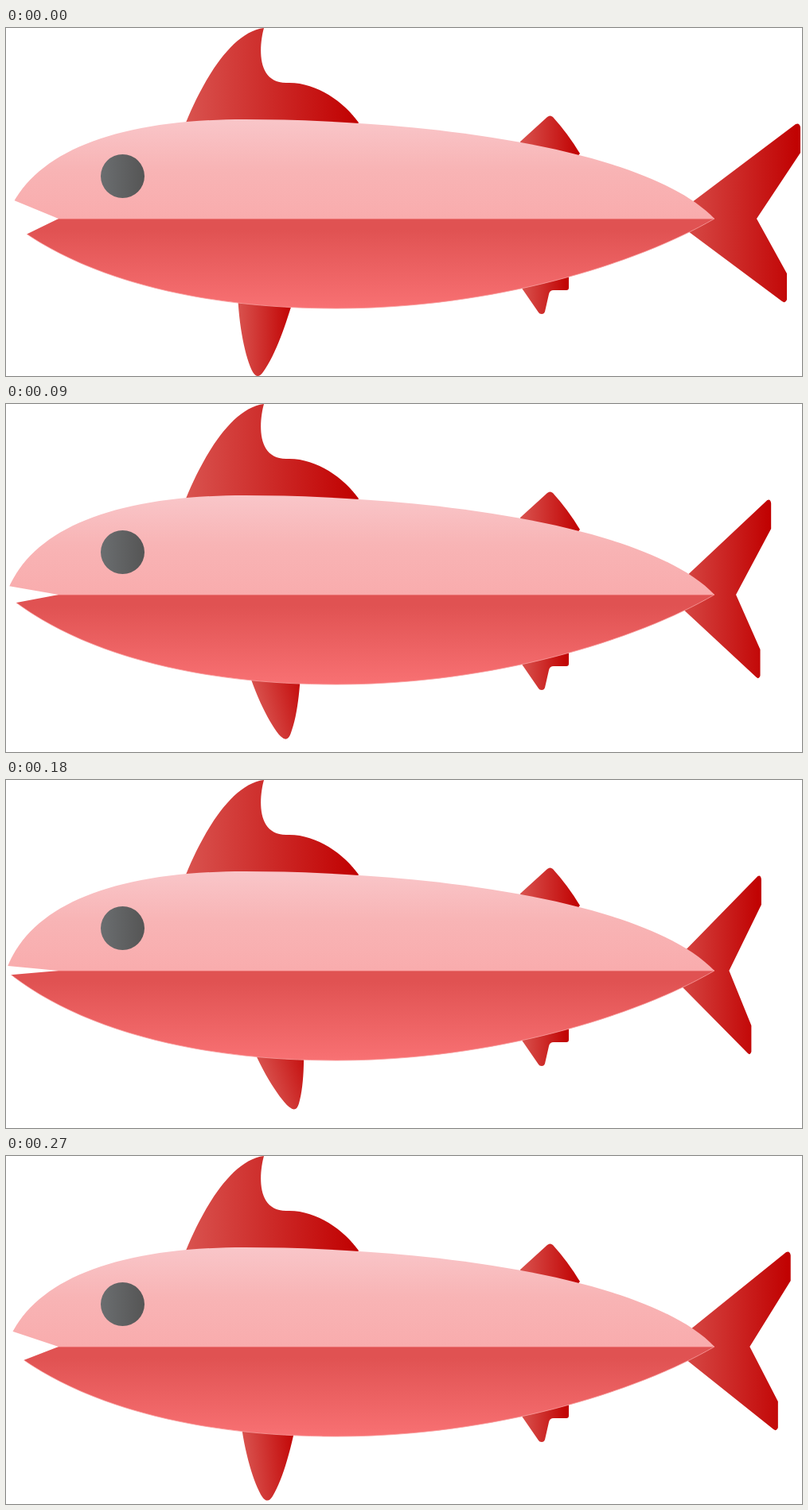
An HTML page that plays this animation: 1000 px wide and 438 px high, repeating every 0.3 s.

```html
<!DOCTYPE html>
<html lang="en">
<head>
<meta charset="utf-8">
<title>Swimming fish</title>
<style>
html, body { margin: 0; width: 100%; height: 100%; overflow: hidden; background: #fff; }
svg { display: block; width: 100%; height: 100%; }
</style>
</head>
<body>
<svg viewBox="0 0 1000 438">
  <defs>
    <linearGradient id="red">
      <stop stop-color="#d9534f"/><stop offset="1" stop-color="#c00000"/>
    </linearGradient>
    <linearGradient id="back" x2="0" y2="1">
      <stop stop-color="#f9c6c9"/><stop offset=".5" stop-color="#f8b4b5"/><stop offset="1" stop-color="#f9acad"/>
    </linearGradient>
    <linearGradient id="belly" x2="0" y2="1">
      <stop offset=".12" stop-color="#e05252"/><stop offset="1" stop-color="#f87173"/>
    </linearGradient>
    <linearGradient id="grey">
      <stop stop-color="#6b6e70"/><stop offset="1" stop-color="#555"/>
    </linearGradient>
  </defs>
  <g fill="url(#red)">
    <path d="M226 119C246 70 282 5 324 0C318 22 314 69 352 69C388 67 424 92 443 119L440 125H226Z"/>
    <path d="M646 143L680 112Q683.500 109 687 112Q706 133 721 158L715 165H650Z"/>
    <path d="M647 326L669 358Q670 360 673 360Q676 360 677 357L682 335Q683 330 688 330H704Q707 330 707 327V312L690 300H655Z"/>
    <path id="tail" d="M835 239.500L992 121Q997 119 998 125V157L943 240L981 309V342Q979 347 975 344Z"/>
    <path id="fin" d="M291 330C292 375 301 416 310 433Q316 443 323 433C339 411 352 372 362 338Z"/>
  </g>
  <path fill="url(#back)" d="M0 240C28 160 130 115 300 115C500 115 800 146 890 240Z"/>
  <path fill="url(#belly)" stroke="#f9a0a0" stroke-width=".8" d="M0 240C90 314 240 353 415 353C610 353 790 298 890 240Z"/>
  <circle cx="146.500" cy="186.500" r="27.500" fill="url(#grey)"/>
  <path id="mouth" fill="#fff"/>
</svg>
<script>
const [tail, fin, mouth] = ["tail", "fin", "mouth"].map(id => document.getElementById(id));
const STEP = 30, STEPS = 10;

function draw(ms) {
  const n = Math.floor(ms / STEP) % STEPS;
  const k = Math.min(n, STEPS - n); // swings 0..5 and back
  tail.setAttribute("transform", `translate(812 0) scale(${1 - 0.066 * k} 1) translate(-812 0)`);
  fin.setAttribute("transform", `rotate(${-4.9 * k} 270.8 290)`);
  const reach = 76;
  const top = 240 - reach * (0.411 - 0.0795 * k);
  const bottom = 240 + reach * (0.488 - 0.1 * Math.min(k, 4.88));
  mouth.setAttribute("d", `M66 240L${66 - reach} ${top}V${bottom}Z`);
}

const start = performance.now();
function tick() {
  draw(performance.now() - start);
  requestAnimationFrame(tick);
}
tick();
</script>
</body>
</html>
```
